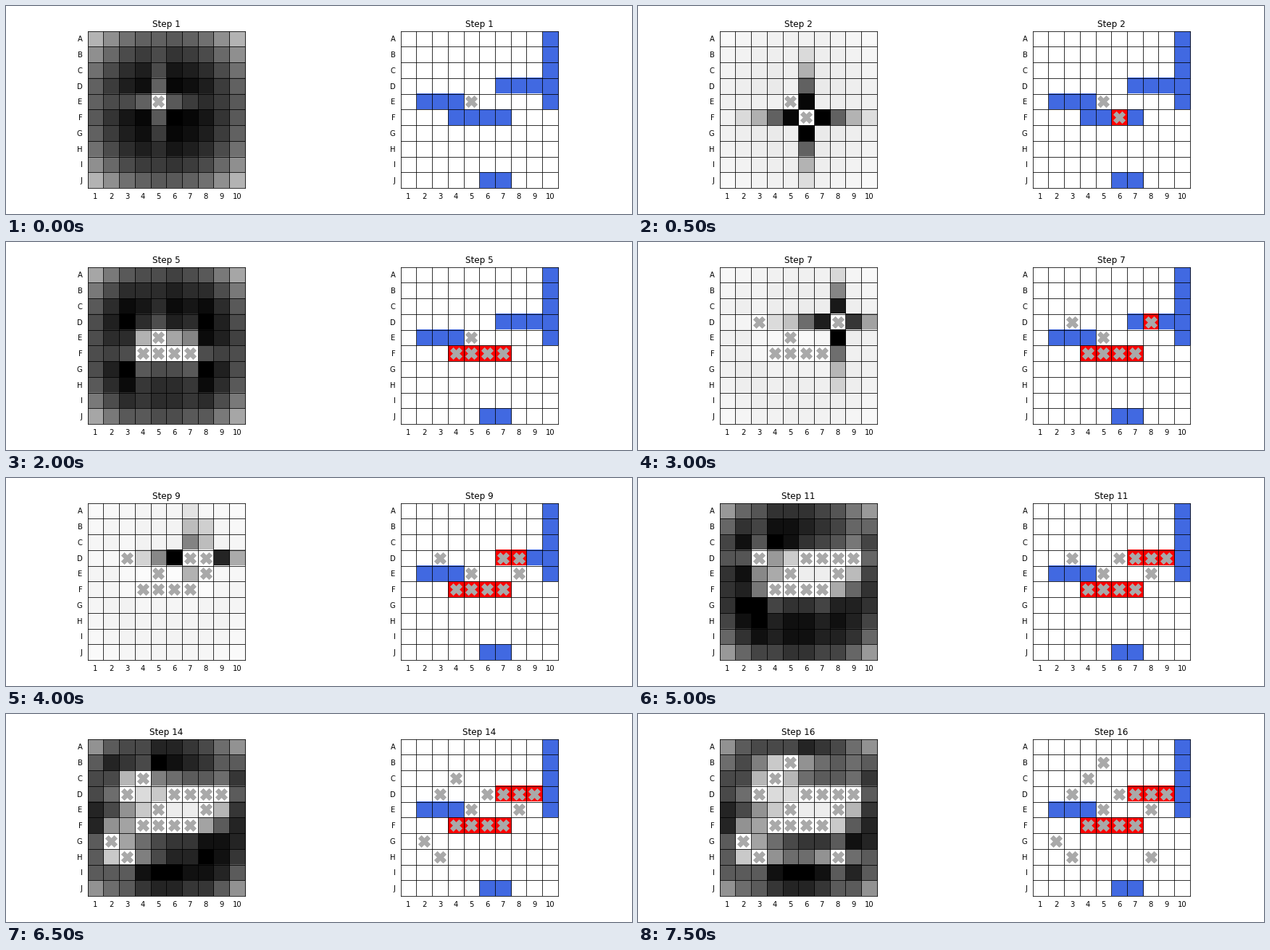
A matplotlib script that plays this animation: 864x288 px, repeating every 8000 ms.

```python
import matplotlib.pyplot as plt
import numpy as np
from matplotlib.animation import FuncAnimation

W, H, DPI = 864, 288, 72
N = 10
ROWS = "ABCDEFGHIJ"
HIT_WEIGHT = 30
LINE = 0.8
SHIPS = ["A10 B10 C10 D10 E10", "F4 F5 F6 F7", "D7 D8 D9", "E2 E3 E4", "J6 J7"]
SHOTS = "E5 F6 F7 F5 F4 D3 D8 E8 D7 D6 D9 C4 G2 H3 B5 H8"
BLUE, RED, WHITE = (65, 105, 225), (255, 0, 0), (255, 255, 255)


def cells(text):
    return [(ROWS.index(c[0]), int(c[1:]) - 1) for c in text.split()]


fleet = [cells(s) for s in SHIPS]
shots = cells(SHOTS)
occupied = {c for ship in fleet for c in ship}


def placements(size):
    for i in range(N):
        for j in range(N - size + 1):
            yield [(i, j + k) for k in range(size)]
            yield [(j + k, i) for k in range(size)]


def heat_map(fired):
    """Count the placements of ships still afloat, favouring open hits."""
    afloat = [s for s in fleet if not fired.issuperset(s)]
    hits = {c for s in afloat for c in s} & fired
    blocked = fired - hits
    heat = np.zeros((N, N))
    for ship in afloat:
        for place in placements(len(ship)):
            if blocked.isdisjoint(place):
                struck = len(hits.intersection(place))
                for c in place:
                    heat[c] += HIT_WEIGHT * struck or 1
    for c in fired:
        heat[c] = 0
    return heat / heat.max()


def board(fired):
    img = np.full((N, N, 3), WHITE, np.uint8)
    for c in occupied:
        img[c] = RED if c in fired else BLUE
    return img


def make_panel(x, data, **kw):
    size, top = 0.755 * H, 0.12 * H
    ax = fig.add_axes([x / W, 1 - (top + size) / H, size / W, size / H])
    img = ax.imshow(data, interpolation="nearest", aspect="auto", **kw)
    for k in range(1, N):
        ax.axhline(k - 0.5, color="black", lw=LINE)
        ax.axvline(k - 0.5, color="black", lw=LINE)
    for spine in ax.spines.values():
        spine.set_linewidth(LINE)
    ax.set_xticks(range(N), range(1, N + 1))
    ax.set_yticks(range(N), list(ROWS))
    ax.tick_params(left=False, bottom=False, labelsize=10)
    ax.set(xlim=(-0.5, N - 0.5), ylim=(N - 0.5, -0.5))
    marks = ax.scatter([], [], s=250, marker="X", color="darkgray", zorder=3)
    title = ax.set_title("", fontsize=12)
    return img, marks, title


plt.rcParams["font.family"] = "DejaVu Sans"
fig = plt.figure(figsize=(W / DPI, H / DPI), dpi=DPI, facecolor="white")
LEFT = 112.535
panels = [
    make_panel(LEFT, np.zeros((N, N)), cmap="binary", vmin=0, vmax=1),
    make_panel(LEFT + W / 2, board(set())),
]


def update(i):
    fired = shots[:i + 1]
    views = heat_map(set(fired)), board(set(fired))
    for (img, marks, title), view in zip(panels, views):
        img.set_data(view)
        marks.set_offsets([(col, row) for row, col in fired])
        title.set_text(f"Step {i + 1}")
    return [artist for panel in panels for artist in panel]


anim = FuncAnimation(fig, update, frames=len(shots), interval=500,
                     repeat=True, repeat_delay=0, blit=False)
plt.show()
```
